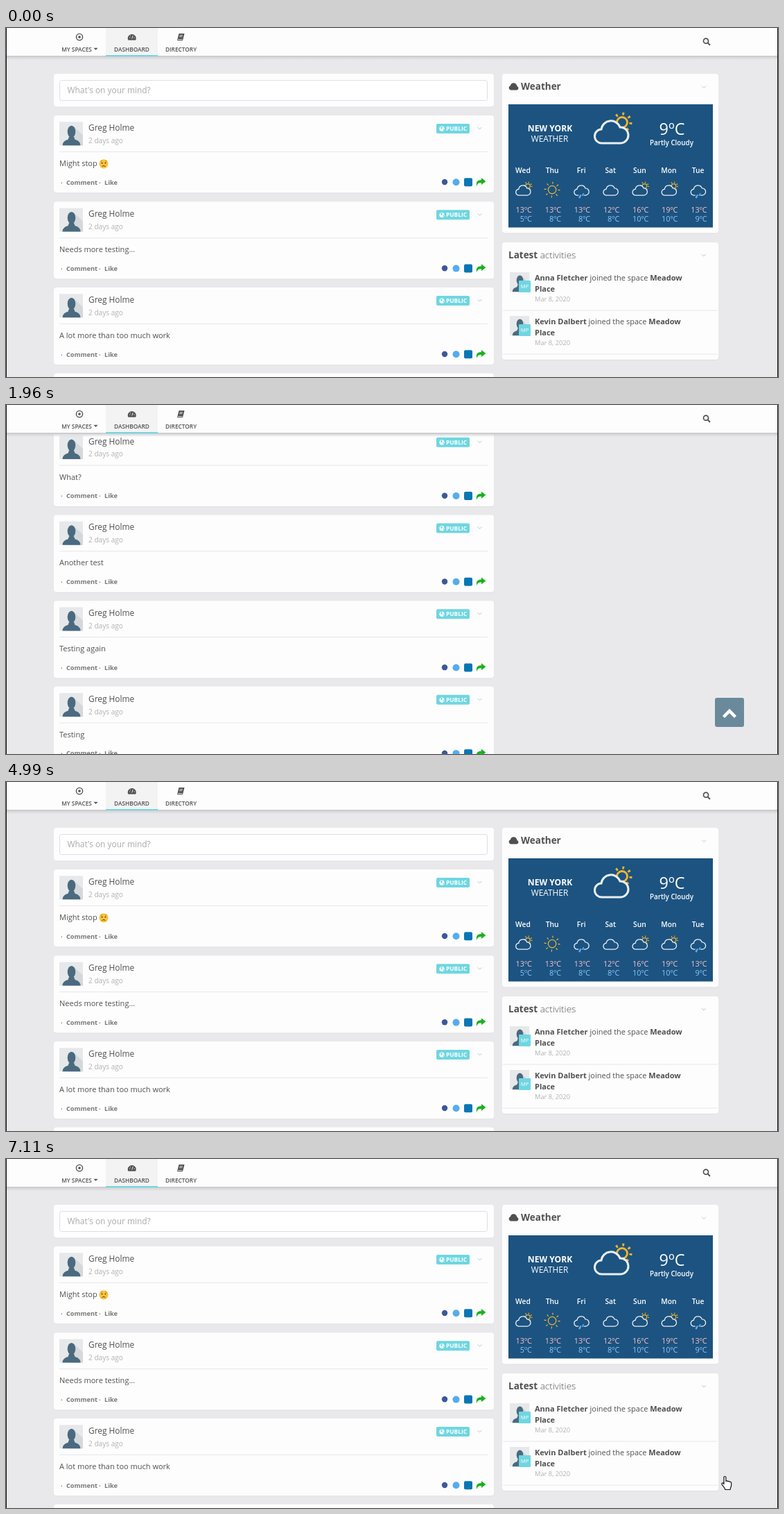
Write an HTML page that moves like this. It is 1114 px wide and 503 px high and loops after 7160 ms.

```html
<!DOCTYPE html>
<html lang="en">
<head>
<meta charset="utf-8">
<title>Dashboard</title>
<style>
html, body { margin: 0; width: 100%; height: 100%; overflow: hidden; background: #e9e9eb; }
svg { display: block; width: 100%; height: 100%; font-family: "Open Sans", "Noto Sans", sans-serif; }
</style>
</head>
<body>
<svg id="stage" viewBox="0 0 1114 503"></svg>
<script>
const CYAN = '#6fd6e1', NAVY = '#1c5380', DARK = '#505050', PAPER = '#fdfdfd';

const text = (x, y, s, size, fill = DARK, extra = '') =>
  `<text x="${x}" y="${y}" font-size="${size}" fill="${fill}" ${extra}>${s}</text>`;
const rect = (x, y, w, h, fill, extra = '') =>
  `<rect x="${x}" y="${y}" width="${w}" height="${h}" fill="${fill}" ${extra}/>`;
const circle = (x, y, r, fill, extra = '') =>
  `<circle cx="${x}" cy="${y}" r="${r}" fill="${fill}" ${extra}/>`;
const path = (d, fill, extra = '') => `<path d="${d}" fill="${fill}" ${extra}/>`;
const line = (d, stroke, width = 1) => path(d, 'none', `stroke="${stroke}" stroke-width="${width}"`);
const at = (x, y, body, scale = 1) => `<g transform="translate(${x} ${y}) scale(${scale})">${body}</g>`;
const card = (x, y, w, h) => rect(x, y + 1, w, h, '#e0e0e3', 'rx="4"') + rect(x, y, w, h, PAPER, 'rx="4"');
const chevron = (x, y) => line(`M${x - 3} ${y - 1.5}l3 3 3-3`, '#bfc6cf');
const BOLD = 'font-weight="700"', SEMI = 'font-weight="600"', MID = 'text-anchor="middle"';

const avatar = rect(0, 0, 34, 34, '#e7e8e9') +
  path('M20 6L34 19V34H14z', '#d5d8da') +
  path('M4.5 34q0-6.500 8-8.500l1.500-4h7l1.500 4q8 2 8 8.500z', '#4a6a80') +
  '<ellipse cx="17.5" cy="14" rx="5.8" ry="8.6" fill="#4a6a80"/>';

// Posts
const posts = ['Might stop', 'Needs more testing...', 'A lot more than too much work', 'What???',
  'Not yet?', 'Working?', 'What?', 'Another test', 'Testing again', 'Testing'];

const face = circle(141, 69.8, 6.6, '#fbc43c') +
  circle(138.5, 68.5, 1, '#5b3b12') + circle(143.5, 68.5, 1, '#5b3b12') +
  line('M138.5 73.5q2.5-2.2 5 0', '#5b3b12') +
  line('M136.5 66.2l2.4-1M145.5 66.2l-2.4-1', '#a8701c', .8);

const globe = circle(629, 19.2, 3.6, '#fff') + path('M627 17l2-1 1 2-2 2zM630 20l2-1-1 3z', CYAN);

const post = (s, i) => at(0, 126 + 123.7 * i + (i ? .6 : 0),
  card(69, 0, 635, 111.3) + at(77, 9.3, avatar) +
  text(119, 22, 'Greg Holme', 11.9) +
  text(119, 39.7, '2 days ago', 10.1, '#b2b2b4') +
  rect(621, 12, 48, 14, CYAN, 'rx="2"') + globe +
  text(635, 22.2, 'PUBLIC', 8.4, '#fff', BOLD) + chevron(683.5, 18.5) +
  line('M77 52.3H695', '#e6e6e9') +
  text(77, 73, s, 11) + (i ? '' : face) +
  text(79, 99.5, '·', 9.2, '#777', BOLD) + text(87, 99.5, 'Comment', 9.2, '#777', BOLD) +
  text(134, 99.5, '·', 9.2, '#777', BOLD) + text(142, 99.5, 'Like', 9.2, '#777', BOLD) +
  circle(633, 96, 4.2, '#3b5998') + circle(649.5, 96.3, 5, '#55acee') +
  rect(661, 90.3, 12, 12, '#0976b4', 'rx="2"') +
  path('M686 90l6.3 5-6.3 5v-3c-4 0-6 1-6.5 5-2-6 1-9 6.5-9z', '#18b21c'));

// Weather panel
const cloud = path('M-13 16a10 10 0 0 1-1-20a14 14 0 0 1 27-3a11.5 11.5 0 0 1 1 23z', NAVY,
  'stroke="#e9eef2" stroke-width="3"');
const sun = (x, y, r, ray, len) => {
  const step = 2 * Math.PI * ray / 8;
  return circle(x, y, r, 'none', 'stroke="#f2b630" stroke-width="2.8"') +
    circle(x, y, ray, 'none', `stroke="#f2b630" stroke-width="${len}" stroke-dasharray="2.8 ${step - 2.8}"`);
};
const drops = rect(-9, 12, 17, 8, NAVY) +
  path('M-4 14l5 0-5 12q-5 1-5-3zM6 9l3 0-3 9q-4 1-4-2z', '#62aef0');
const icons = {
  partly: sun(16, -14, 7.5, 12.5, 4) + cloud,
  sunny: sun(0, -2, 13, 22.5, 7),
  cloudy: cloud,
  rain: cloud + drops
};
const week = [['Wed', 'partly', 13, 5], ['Thu', 'sunny', 13, 8], ['Fri', 'rain', 13, 8], ['Sat', 'cloudy', 12, 8],
  ['Sun', 'partly', 16, 10], ['Mon', 'partly', 19, 10], ['Tue', 'rain', 13, 9]];
const END = 'text-anchor="end" font-weight="500"';
const day = ([name, icon, hi, lo], i) => at(746 + 42.1 * i, 0,
  text(0, 209, name, 10.3, '#fff', MID + ' ' + SEMI) + at(0, 234, icons[icon], .44) +
  text(13, 266, hi + 'ºC', 10.9, '#ffc2c6', END) +
  text(13, 279, lo + 'ºC', 10.9, '#8cc8fa', END));

const weather = card(716, 66, 312, 229.5) +
  path('M728 89.5a3.4 3.4 0 0 1 0-6.5a4.6 4.6 0 0 1 8.5-1.5a3.5 3.5 0 0 1 1 2.4a2.9 2.9 0 0 1-.5 5.6z', DARK) +
  text(743, 89, 'Weather', 13.5, DARK, BOLD) + chevron(1007, 85) +
  rect(725, 110, 295, 177.5, NAVY) +
  text(785, 149, 'NEW YORK', 12.1, '#fff', MID + ' ' + BOLD) +
  text(784.5, 163.5, 'WEATHER', 11.9, '#fff', MID + ' font-weight="500"') +
  at(873, 150, icons.partly) +
  text(961, 154, '9ºC', 23.5, '#fff', MID) +
  text(960.5, 169, 'Partly Cloudy', 9.8, '#fff', MID + ' ' + SEMI) +
  week.map(day).join('') +
  rect(724, 110, 297, 0, PAPER, 'id="blank"');

// Activity list
const activity = (name, y) => at(0, y,
  at(727, 0, avatar, .83) + rect(740, 12, 17, 17, CYAN, 'rx="1"') +
  text(748.5, 23.3, 'MP', 7.6, '#fff', MID) +
  text(763, 12.3, `<tspan ${BOLD}>${name}</tspan> joined the space <tspan ${BOLD}>Meadow</tspan>`, 11) +
  text(763, 27.5, 'Place', 11, DARK, BOLD) +
  text(763, 42.3, 'Mar 8, 2020', 9.3, '#b2b2b4') +
  line('M717 55H1027', '#e8e8ec'));
const activities = card(716, 309, 312, 169) +
  text(725, 331.5, `<tspan ${BOLD}>Latest</tspan> <tspan font-weight="300">activities</tspan>`, 13.5) +
  chevron(1007, 327.5) + activity('Anna Fletcher', 352) + activity('Kevin Dalbert', 415);

const composer = card(69, 66, 635, 47.5) +
  rect(77.5, 75.5, 617, 29, '#fff', 'rx="3" stroke="#dedee4"') +
  text(88.5, 94, "What's on your mind?", 11.9, '#aaa');

// Top bar
const tab = (x, s) => text(x, 33.5, s, 8.3, DARK, MID + ' ' + SEMI);
const header = rect(0, 41, 1114, 5, 'url(#shade)') + rect(0, 0, 1114, 41, PAPER) +
  rect(0, 40, 1114, 1, '#c6c6c8') +
  rect(144, 0, 75, 40, '#f3f3f3') + rect(144, 39, 75, 2, CYAN) +
  circle(106, 13, 4.6, 'none', `stroke="${DARK}" stroke-width="1.4"`) + circle(106, 13, 1.8, DARK) +
  path('M176.3 17.5a6 6 0 1 1 10.8 0z', DARK) +
  line('M181.7 15.5l1.5-4.5M178 14h1.3M184.5 14h1.3M179 11l1 .8', '#fff', .9) +
  path('M249.5 8h8l-2.5 10h-8z', DARK) + line('M250.5 10.5h4.5M250 12.5h4.5M248 16.5h6.5', '#fff', .8) +
  tab(102, 'MY SPACES') + path('M126.5 28.7h6l-3 3z', DARK) +
  tab(181.5, 'DASHBOARD') + tab(252.5, 'DIRECTORY') +
  circle(1010, 18.7, 3.5, 'none', `stroke="${DARK}" stroke-width="1.7"`) +
  line('M1012.6 21.4l3.3 3.3', DARK, 2);

const hand = path('M-1.6 1.4C-1.6-.5 1.4-.5 1.4 1.4V7c.8-1 2.6-.7 2.9.4 .8-.8 2.3-.5 2.6.6 1-.5 2.2 0 2.2 1.3V13' +
  'c0 2-1.4 3-1.6 6H.3C.1 16.8-2.6 14-4.4 11.6c-1-1.5.8-2.8 2-1.6l.8 1z', '#fff',
  'stroke="#111" stroke-width="1.2" stroke-linejoin="round"');

const $ = id => document.getElementById(id);
$('stage').innerHTML =
  '<linearGradient id="shade" x2="0" y2="1"><stop stop-color="#cfcfd2"/>' +
  '<stop offset="1" stop-color="#cfcfd2" stop-opacity="0"/></linearGradient>' +
  rect(0, 0, 1114, 503, '#e9e9eb') +
  `<g id="page">${composer + posts.map(post).join('') + weather + activities}</g>` + header +
  rect(1023, 422, 42, 42, '#000', 'id="up" rx="3"') +
  path('M1035.5 449.5l8.5-8.5 8.5 8.5', 'none', 'id="arrow" stroke="#fff" stroke-width="4.5"') +
  `<g id="hand">${hand}</g>` +
  rect(0, 0, 1, 503, '#111') + rect(1113, 0, 1, 503, '#111');

// Motion
const LOOP = 7160, DEEP = 858, RISE = 740, RISES = [2638.6, 5801.6], PAINT_LAG = 93;
const clamp = v => Math.max(0, Math.min(1, v));
const mix = (a, b, k) => a + (b - a) * k;
const track = (t, keys) => {
  const i = keys.findIndex(k => k[0] > t);
  if (i < 0) return keys[keys.length - 1][1];
  if (!i) return keys[0][1];
  const [t0, a] = keys[i - 1], [t1, b] = keys[i];
  return mix(a, b, (t - t0) / (t1 - t0));
};

function scrollAt(t) {
  const rise = t < 4200 ? RISES[0] : RISES[1];
  if (t >= rise) return DEEP * (1 + Math.cos(Math.PI * clamp((t - rise) / RISE))) / 2;
  return track(t, [[474, 0], [1270, 446.7], [1960, 833.8], [2060, DEEP], [4200, DEEP],
    [4200, 0], [5030, 0], [5650, DEEP]]);
}

const idle = [65, 107, 130], hover = [46, 50, 49];

function draw(t) {
  $('page').setAttribute('transform', `translate(0 ${-scrollAt(t)})`);
  // The embedded widget repaints late, so its newly revealed top stays blank
  $('blank').setAttribute('height', Math.max(0, Math.min(178, scrollAt(t - PAINT_LAG) - 110)));
  const over = track(t, [[2450, 0], [2600, 1], [4200, 1], [4201, 0], [5600, 0], [5750, 1]]);
  const alpha = track(t, [[1050, 0], [1270, .35], [1520, .75], [2450, .75], [2600, 1], [3230, 1], [3630, 0],
    [5250, 0], [5490, .75], [5600, .75], [5750, 1], [6393, 1], [6793, 0]]);
  $('up').setAttribute('fill', `rgb(${idle.map((c, i) => Math.round(mix(c, hover[i], over)))})`);
  $('up').setAttribute('opacity', alpha);
  $('arrow').setAttribute('opacity', clamp(alpha * 2));
  const x = track(t, [[2300, 1049], [2500, 1039], [4200, 1039], [5400, 1047], [5600, 1037.5]]);
  const y = track(t, [[2300, 520], [2500, 446.5], [3750, 446.5], [3950, 520], [5400, 520], [5600, 457.5]]);
  $('hand').setAttribute('transform', `translate(${x} ${y})`);
}

const start = performance.now();
(function tick() {
  draw((performance.now() - start) % LOOP);
  requestAnimationFrame(tick);
})();
</script>
</body>
</html>
```
